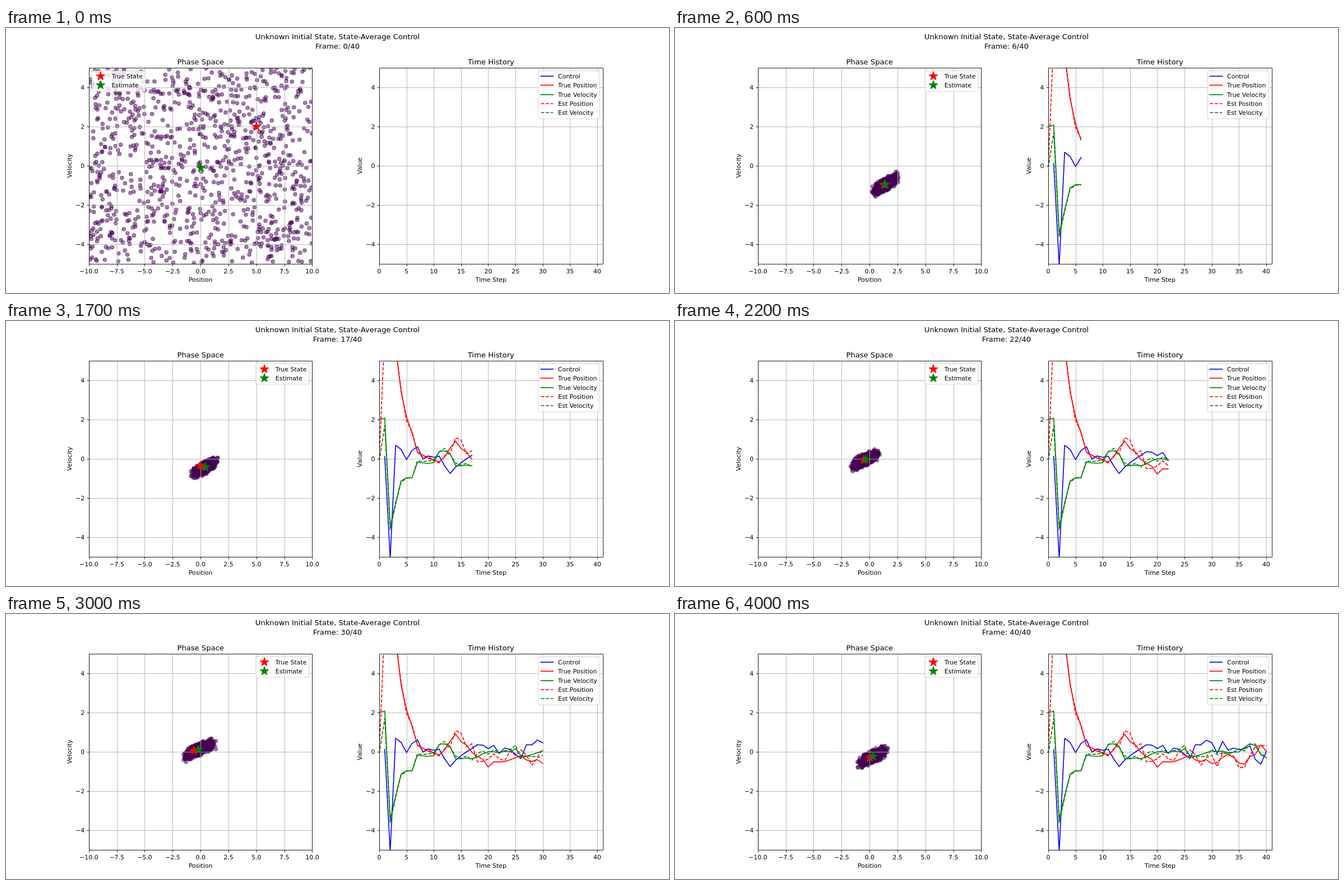
An HTML page with a canvas for the animation above (4.1 s loop, 1183 by 473 pixels).

```html
<!DOCTYPE html>
<html lang="en">
<head>
<meta charset="utf-8">
<title>Particle filter control</title>
<style>
html, body { margin: 0; width: 100%; height: 100%; overflow: hidden; background: #fff; }
canvas { display: block; }
</style>
</head>
<body>
<canvas id="stage" width="1183" height="473"></canvas>
<script>
const ctx = document.getElementById('stage').getContext('2d');
const W = 1183, H = 473, PT = W / 15 / 72;
const STEPS = 40, STEP_MS = 100, COUNT = 1000;
const FONT = 10 * PT, TITLE = 12 * PT, LINE = 1.5 * PT, HAIR = 0.8 * PT;
const DASH = [3.7 * LINE, 1.6 * LINE];
const RED = '#ff0000', GREEN = '#008000', BLUE = '#0000ff', GRID = '#b0b0b0';
const TOP = H * 0.15, BOTTOM = H * 0.89, AXIS_W = W * 0.775 / 2.3;

const snap = v => Math.round(v - 0.1) + 0.5;
const range = (from, to, step) =>
  Array.from({ length: Math.round((to - from) / step) + 1 }, (_, i) => from + i * step);
const py = v => TOP + (5 - v) / 10 * (BOTTOM - TOP);

function seeded(seed) {
  let s = seed * 2654435761 >>> 0;
  return () => {
    s = s + 0x6D2B79F5 >>> 0;
    let t = Math.imul(s ^ s >>> 15, s | 1);
    t ^= t + Math.imul(t ^ t >>> 7, t | 61);
    return ((t ^ t >>> 14) >>> 0) / 4294967296;
  };
}

// Turning points of the position: [step, value]
const turns = [[0, 5], [1, 7], [2, 9.1], [3, 5.7], [4, 3.4], [5, 2.2], [7, 0.42], [11, -0.2],
  [14, 0.9], [17, 0], [20, -0.7], [26, -0.2], [30, -0.6], [33, -0.25], [36, -0.65],
  [39, 0.25], [41, -0.1]];

function path(k) {
  const i = Math.max(1, turns.findIndex(([t]) => t >= k));
  const [t0, a] = turns[i - 1], [t1, b] = turns[i];
  return a + (b - a) * (k - t0) / (t1 - t0);
}

const feedback = s => -(0.44 * s.estPos + 1.28 * s.estVel);

// Velocity follows the position, the estimate trails the truth, control acts on the estimate.
function simulate() {
  const rnd = seeded(5), states = [];
  const jitter = size => (rnd() * 2 - 1) * size;
  for (let k = 0; k <= STEPS; k++) {
    const settle = 1 - Math.exp(-k / 6), lag = 0.35 * Math.exp((1 - k) / 2);
    const pos = path(k) + jitter(0.12) * settle;
    const vel = path(k + 1) - path(k) + jitter(0.15) * settle;
    states.push({
      pos, vel,
      estPos: k ? pos - lag + (0.08 + jitter(0.4)) * settle : 0.03,
      estVel: k ? vel - lag + jitter(0.2) * settle : -0.1,
      control: k ? feedback(states[k - 1]) : 0
    });
  }
  return states;
}
const states = simulate();

const series = [
  { name: 'Control', color: BLUE, key: 'control', start: 1 },
  { name: 'True Position', color: RED, key: 'pos', start: 0 },
  { name: 'True Velocity', color: GREEN, key: 'vel', start: 0 },
  { name: 'Est Position', color: RED, key: 'estPos', start: 0, dashed: true },
  { name: 'Est Velocity', color: GREEN, key: 'estVel', start: 0, dashed: true }
];

function particles(step) {
  const rnd = seeded(step + 11), { estPos, estVel } = states[step];
  const bell = () => (rnd() + rnd() + rnd() - 1.5) * 2;
  const spreadX = 0.49 + 0.06 * Math.cos((step - 30) * 0.16);
  const spreadV = 0.2 + 4 * Math.exp(-step);
  return Array.from({ length: COUNT }, () => {
    if (step === 0) return [rnd() * 20 - 10, rnd() * 10 - 5];
    const a = bell(), b = bell();
    return [estPos + spreadX * a, estVel + spreadV * (0.65 * a + 0.65 * b)];
  });
}

function makeAxes(left, min, max, ticks, format, labels) {
  const px = v => left + (v - min) / (max - min) * AXIS_W;
  return { left, right: left + AXIS_W, px, ticks, format, ...labels };
}
const phase = makeAxes(W * 0.125, -10, 10, range(-10, 10, 2.5), v => v.toFixed(1),
  { title: 'Phase Space', xLabel: 'Position', yLabel: 'Velocity' });
const history = makeAxes(W * 0.9 - AXIS_W, 0, 41, range(0, 40, 5), String,
  { title: 'Time History', xLabel: 'Time Step', yLabel: 'Value' });

function text(str, x, y, size = FONT, align = 'center') {
  ctx.font = `${size}px "DejaVu Sans", sans-serif`;
  ctx.textAlign = align;
  ctx.fillStyle = '#000';
  ctx.fillText(str.replace(/^-/, '\u2212'), x, y);
}

function segment(x1, y1, x2, y2, color) {
  ctx.beginPath();
  ctx.moveTo(x1, y1);
  ctx.lineTo(x2, y2);
  ctx.strokeStyle = color;
  ctx.lineWidth = HAIR;
  ctx.stroke();
}

function clipped(ax, draw) {
  ctx.save();
  ctx.beginPath();
  ctx.rect(ax.left, TOP, AXIS_W, BOTTOM - TOP);
  ctx.clip();
  draw();
  ctx.restore();
}

function drawGrid(ax) {
  clipped(ax, () => {
    for (const v of ax.ticks) segment(snap(ax.px(v)), TOP, snap(ax.px(v)), BOTTOM, GRID);
    for (const v of range(-4, 4, 2)) segment(ax.left, snap(py(v)), ax.right, snap(py(v)), GRID);
  });
}

function drawFrame(ax) {
  const x0 = snap(ax.left), y1 = snap(BOTTOM), tick = 3.5 * PT;
  const mid = (ax.left + ax.right) / 2;
  ctx.strokeStyle = '#000';
  ctx.lineWidth = HAIR;
  ctx.strokeRect(x0, snap(TOP), snap(ax.right) - x0, y1 - snap(TOP));
  for (const v of ax.ticks) {
    segment(snap(ax.px(v)), y1, snap(ax.px(v)), y1 + tick, '#000');
    text(ax.format(v), ax.px(v), 438);
  }
  for (const v of range(-4, 4, 2)) {
    segment(x0 - tick, snap(py(v)), x0, snap(py(v)), '#000');
    text(String(v), ax.left - 2 * tick, Math.round(py(v) + 4), FONT, 'right');
  }
  text(ax.title, mid, 65, TITLE);
  text(ax.xLabel, mid, 453);
  ctx.save();
  ctx.translate(Math.round(ax.left - 30.8), (TOP + BOTTOM) / 2);
  ctx.rotate(-Math.PI / 2);
  text(ax.yLabel, 0, 0);
  ctx.restore();
}

function drawDots(step) {
  ctx.fillStyle = ctx.strokeStyle = 'rgba(68, 1, 84, 0.5)';
  ctx.lineWidth = PT;
  for (const [x, v] of particles(step)) {
    ctx.beginPath();
    ctx.arc(phase.px(x), py(v), 3 * PT, 0, 2 * Math.PI);
    ctx.fill();
    ctx.stroke();
  }
}

function drawStar(x, y, color) {
  ctx.beginPath();
  for (let i = 0; i < 10; i++) {
    const r = 7.5 * PT * (i % 2 ? 0.382 : 1), a = i * Math.PI / 5;
    ctx.lineTo(x + r * Math.sin(a), y - r * Math.cos(a));
  }
  ctx.closePath();
  ctx.fillStyle = ctx.strokeStyle = color;
  ctx.lineWidth = PT;
  ctx.lineJoin = 'bevel';
  ctx.fill();
  ctx.stroke();
}

function strokeSeries(s, points) {
  ctx.save();
  ctx.strokeStyle = s.color;
  ctx.lineWidth = LINE;
  ctx.lineJoin = 'round';
  ctx.lineCap = s.dashed ? 'butt' : 'square';
  ctx.setLineDash(s.dashed ? DASH : []);
  ctx.beginPath();
  for (const [x, y] of points) ctx.lineTo(x, y);
  ctx.stroke();
  ctx.restore();
}

function drawSeries(s, step) {
  if (step <= s.start) return;
  strokeSeries(s, range(s.start, step, 1).map(k => [history.px(k), py(states[k][s.key])]));
}

function drawLegend(left, width, names, drawHandle) {
  const top = TOP + 0.5 * FONT, pitch = 16.35;
  ctx.beginPath();
  ctx.roundRect(left, top, width, pitch * names.length + 3.8, 0.2 * FONT);
  ctx.fillStyle = 'rgba(255, 255, 255, 0.8)';
  ctx.strokeStyle = 'rgba(204, 204, 204, 0.8)';
  ctx.lineWidth = PT;
  ctx.fill();
  ctx.stroke();
  names.forEach((name, i) => {
    const y = Math.round(86 + i * pitch);
    drawHandle(i, left + 0.4 * FONT, y);
    text(name, left + 3.2 * FONT, y + 4, FONT, 'left');
  });
}

function phaseLegend(step) {
  const width = 95.3, pad = 0.5 * FONT;
  const left = step < 2 ? phase.left + pad : phase.right - pad - width;
  drawLegend(left, width, ['True State', 'Estimate'],
    (i, x, y) => drawStar(x + FONT, y, i ? GREEN : RED));
}

function historyLegend() {
  const width = 109.2;
  drawLegend(history.right - 0.5 * FONT - width, width, series.map(s => s.name),
    (i, x, y) => strokeSeries(series[i], [[x, y], [x + 2 * FONT, y]]));
}

function draw(step) {
  const { pos, vel, estPos, estVel } = states[step];
  ctx.fillStyle = '#fff';
  ctx.fillRect(0, 0, W, H);
  text('Unknown Initial State, State-Average Control', W / 2, 20, TITLE);
  text(`Frame: ${step}/${STEPS}`, W / 2, 37, TITLE);

  clipped(phase, () => drawDots(step));
  drawGrid(phase);
  drawFrame(phase);
  clipped(phase, () => {
    drawStar(phase.px(pos), py(vel), RED);
    drawStar(phase.px(estPos), py(estVel), GREEN);
  });
  phaseLegend(step);

  drawGrid(history);
  clipped(history, () => series.forEach(s => drawSeries(s, step)));
  drawFrame(history);
  historyLegend();
}

let shown = -1;
const begin = performance.now();
function tick() {
  const elapsed = Math.max(0, performance.now() - begin);
  const step = Math.floor(elapsed / STEP_MS) % (STEPS + 1);
  if (step !== shown) draw(shown = step);
  requestAnimationFrame(tick);
}
tick();
</script>
</body>
</html>
```
